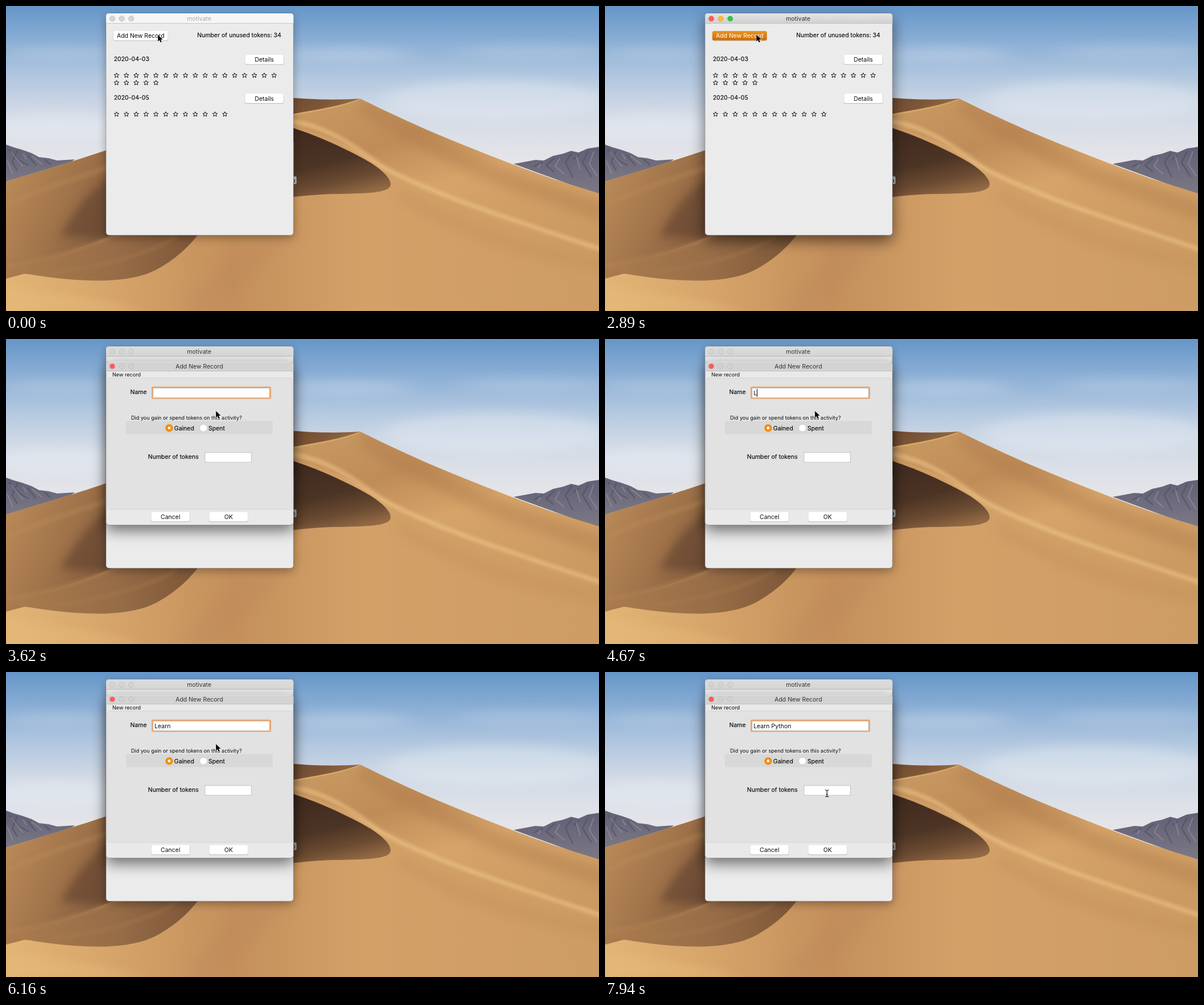
Write an HTML page that moves like this. It is 1043x537 px and loops after 8000 ms.

```html
<!DOCTYPE html>
<html lang="en">
<head>
<meta charset="utf-8">
<title>motivate</title>
<style>
  html, body { margin: 0; width: 100%; height: 100%; overflow: hidden; background: #cf9c60; }
  svg { display: block; width: 100vw; height: 100vh; }
  text { font: 10.5px Inter, "Open Sans", sans-serif; fill: #0b0b0b; white-space: pre; }
  .label { stroke: #0b0b0b; stroke-width: .15px; }
  .small { font-size: 9.1px; }
  .mid { text-anchor: middle; }
</style>
</head>
<body>
<svg id="stage" viewBox="0 0 1043 537" preserveAspectRatio="none">
  <defs>
    <linearGradient id="sky" x2="0" y2="1">
      <stop offset="0" stop-color="#6596c8"/><stop offset=".18" stop-color="#8aaed5"/>
      <stop offset=".36" stop-color="#b0c6df"/><stop offset=".55" stop-color="#d2dae6"/>
      <stop offset=".8" stop-color="#e5e5e9"/>
    </linearGradient>
    <linearGradient id="peak" x2=".75" y2="1">
      <stop offset="0" stop-color="#cb9c64"/><stop offset=".35" stop-color="#bf8c58"/>
      <stop offset=".6" stop-color="#d6a469"/><stop offset="1" stop-color="#cb9a62"/>
    </linearGradient>
    <linearGradient id="back" x2="1" y2=".3">
      <stop offset="0" stop-color="#6a482f"/><stop offset=".6" stop-color="#7d5637"/>
      <stop offset="1" stop-color="#9a6e44"/>
    </linearGradient>
    <linearGradient id="hollow" x1=".2" y1="0" x2=".55" y2="1">
      <stop offset="0" stop-color="#3c281e"/><stop offset=".55" stop-color="#4c3424"/>
      <stop offset=".8" stop-color="#6b4b32"/><stop offset="1" stop-color="#946a44"/>
    </linearGradient>
    <linearGradient id="left" gradientUnits="userSpaceOnUse" x1="0" y1="310" x2="200" y2="400">
      <stop offset="0" stop-color="#b98957"/><stop offset=".5" stop-color="#a0734a"/>
      <stop offset="1" stop-color="#7c573a"/>
    </linearGradient>
    <linearGradient id="basin" gradientUnits="userSpaceOnUse" x1="0" y1="460" x2="320" y2="430">
      <stop offset="0" stop-color="#ab7c4e"/><stop offset=".6" stop-color="#976d47"/>
      <stop offset="1" stop-color="#80593a"/>
    </linearGradient>
    <linearGradient id="front" gradientUnits="userSpaceOnUse" x1="0" y1="0" x2="1043" y2="0">
      <stop offset="0" stop-color="#e2b576"/><stop offset=".2" stop-color="#d4a268"/>
      <stop offset=".38" stop-color="#c48f5b"/><stop offset=".6" stop-color="#d3a168"/>
      <stop offset="1" stop-color="#cd9c64"/>
    </linearGradient>
    <linearGradient id="rock" x2="0" y2="1">
      <stop offset="0" stop-color="#606075"/><stop offset="1" stop-color="#7d7986"/>
    </linearGradient>
    <linearGradient id="bar" x2="0" y2="1">
      <stop offset="0" stop-color="#e4e4e4"/><stop offset="1" stop-color="#d0d0d0"/>
    </linearGradient>
    <linearGradient id="pressed" x2="0" y2="1">
      <stop offset="0" stop-color="#eb951d"/><stop offset="1" stop-color="#d06a02"/>
    </linearGradient>
    <filter id="soft3" x="-20%" y="-50%" width="140%" height="200%"><feGaussianBlur stdDeviation="3"/></filter>
    <filter id="soft8" x="-30%" y="-30%" width="160%" height="160%"><feGaussianBlur stdDeviation="8"/></filter>
    <filter id="soft13" x="-30%" y="-30%" width="160%" height="160%"><feGaussianBlur stdDeviation="13"/></filter>
    <filter id="soft22" x="-80%" y="-150%" width="260%" height="400%"><feGaussianBlur stdDeviation="22 9"/></filter>
    <clipPath id="dunes"><path id="ridge" d="M0 309C60 291 120 273 176 254L505 190C548 182 590 176 623 163C662 183 735 217 800 243C850 263 900 283 960 304L1043 330V537H0Z"/></clipPath>
  </defs>

  <rect width="1043" height="340" fill="url(#sky)"/>
  <g fill="#e5eaf2" filter="url(#soft22)">
    <ellipse cx="90" cy="215" rx="130" ry="24" opacity=".6"/>
    <ellipse cx="95" cy="82" rx="95" ry="10" opacity=".22"/>
    <ellipse cx="600" cy="85" rx="110" ry="14" opacity=".25"/>
    <ellipse cx="860" cy="165" rx="200" ry="36" opacity=".45"/>
    <ellipse cx="925" cy="80" rx="130" ry="12" opacity=".2"/>
  </g>
  <g fill="url(#rock)">
    <path d="M0 244L14 249L28 253L45 259L58 266L75 268L90 272L121 270L100 285L0 312Z"/>
    <path d="M893 278L915 274L931 271L946 272L962 264L980 260L994 255L1007 258L1023 251L1043 248V333Z"/>
  </g>
  <g fill="none" stroke="#484a60" stroke-width="2.5" opacity=".5">
    <path d="M5 252L25 273L40 281M38 262L53 281M68 270L79 280M20 254L11 275L20 290"/>
    <path d="M944 275L928 283M965 267L950 281L964 292M995 259L984 275L997 302M1024 256L1014 275L1030 301M1008 262L998 270"/>
  </g>
  <g fill="none" stroke="#a19ba1" stroke-width="2" opacity=".5">
    <path d="M9 256L30 283M2 272L12 296M45 264L64 279M30 260L36 270"/>
    <path d="M940 278L936 286M974 268L966 282L982 296M1003 264L1010 288M1034 256L1026 278L1040 300"/>
  </g>

  <path d="M480 160C520 163 565 167 623 163C597 178 553 188 480 194Z" fill="url(#back)"/>
  <use href="#ridge" fill="url(#front)"/>
  <g clip-path="url(#dunes)">
    <path d="M480 192C550 183 600 175 623 163L1043 330V432C890 390 735 324 660 279C610 248 560 223 480 205Z" fill="url(#peak)"/>
    <path d="M625 172C675 205 740 241 820 279S980 336 1050 364" fill="none" stroke="#ab784b" stroke-width="32" opacity=".35" filter="url(#soft8)"/>
    <path d="M500 203C560 210 612 246 658 280C740 328 860 366 1050 430" fill="none" stroke="#eec688" stroke-width="7" opacity=".7" filter="url(#soft3)"/>
    <path d="M623 163C592 177 545 185 490 194" fill="none" stroke="#dcae70" stroke-width="2.5" opacity=".7"/>
    <path d="M690 330C780 386 890 427 1050 455" fill="none" stroke="#b7844f" stroke-width="24" opacity=".2" filter="url(#soft8)"/>
    <path d="M470 205C530 219 589 247 631 270C662 287 680 306 676 317C671 329 635 330 586 331C550 331 526 334 470 340Z" fill="url(#hollow)"/>
    <path d="M0 309C60 291 120 273 176 254L300 240V400L0 480Z" fill="url(#left)"/>
    <path d="M0 350C65 320 126 302 190 281" fill="none" stroke="#bd8d5a" stroke-width="10" opacity=".35" filter="url(#soft3)"/>
    <path d="M95 405C120 365 140 325 205 285V410Z" fill="#55382a" opacity=".5" filter="url(#soft8)"/>
    <path d="M0 462C80 445 150 420 200 398H341C315 434 285 453 263 465C216 488 145 486 80 478C44 473 20 469 0 467Z" fill="url(#basin)"/>
    <path d="M0 459C80 443 140 424 205 400" fill="none" stroke="#bd8d5a" stroke-width="4" opacity=".5" filter="url(#soft3)"/>
    <path d="M80 470C160 460 250 438 300 406" fill="none" stroke="#ad7f50" stroke-width="5" opacity=".45" filter="url(#soft3)"/>
    <path d="M0 493C70 501 155 513 250 540H0Z" fill="#e9c17f" opacity=".35" filter="url(#soft8)"/>
    <path d="M320 537C390 485 455 423 505 370" fill="none" stroke="#b6815a" stroke-width="50" opacity=".22" filter="url(#soft13)"/>
  </g>

  <rect x="490" y="240" width="16.5" height="61" fill="#77736f"/>
  <rect x="490" y="300" width="21" height="13.5" rx="2" fill="#b5b4b1"/>
  <text x="502.5" y="310.5">o</text>

  <g id="quietShade"><rect x="176" y="18" width="329.5" height="390" rx="5" opacity=".33" filter="url(#soft8)"/></g>
  <g id="busyShade"><rect x="176" y="23" width="329.5" height="390" rx="5" opacity=".55" filter="url(#soft13)"/></g>
  <g id="main"></g>
  <g id="dialog"></g>
  <g id="arrow"><path d="M0 0V11.6L2.7 9.1L4.5 13.3L6.6 12.4L4.8 8.3H8.5Z" stroke="#fff" stroke-width="1.1" paint-order="stroke" stroke-linejoin="round"/></g>
  <g id="beam" fill="none" stroke-linecap="round">
    <path id="beamLine" d="M-3 -6Q0 -6 0 -4Q0 -6 3 -6M0 -4V4M-3 6Q0 6 0 4Q0 6 3 6M-1.5 2H1.5" stroke="#fff" stroke-width="2.6"/>
    <path d="M-3 -6Q0 -6 0 -4Q0 -6 3 -6M0 -4V4M-3 6Q0 6 0 4Q0 6 3 6M-1.5 2H1.5" stroke="#111" stroke-width="1.1"/>
  </g>
</svg>
<script>
const $ = id => document.getElementById(id);
const LOOP = 8000;

const label = (x, y, s, cls = 'label', extra = '') =>
  `<text x="${x}" y="${y}" class="${cls}" ${extra}>${s}</text>`;

const button = (x, y, w, s, id = '') =>
  `<rect x="${x}" y="${y + .5}" width="${w}" height="17" rx="3.2" fill="#b9b9b9"/>
   <rect ${id && `id="${id}"`} x="${x + .4}" y="${y}" width="${w - .8}" height="16.6" rx="3" fill="#fff"/>
   ${label(x + w / 2, y + 12.2, s, 'mid', id && `id="${id}Text"`)}`;

const lights = (y, colours, rim) => colours.map((c, i) =>
  `<circle cx="${187 + i * 16.6}" cy="${y}" r="4.8" fill="${c}" stroke="${rim}" stroke-width=".7"/>`).join('');

function stars(n, y) {
  let d = '';
  for (let i = 0; i < n; i++) {
    for (let k = 0; k < 10; k++) {
      const r = k % 2 ? 2 : 4.5, a = Math.PI * (k / 5 - .5);
      d += (k ? 'L' : 'M') + (194.4 + i * 17.32 + r * Math.cos(a)).toFixed(2) + ' ' + (y + r * Math.sin(a)).toFixed(2);
    }
    d += 'Z';
  }
  return `<path d="${d}" fill="none" stroke="#111" stroke-width="1"/>`;
}

const titleBar = (y, h, fill, id) =>
  `<path ${id && `id="${id}"`} d="M176 ${y + h}V${y + 5}q0 -5 5 -5H500.5q5 0 5 5V${y + h}Z" fill="${fill}"/>
   <path d="M176 ${y + h - .5}H505.5" stroke="#bcbcbc" stroke-width=".8"/>`;

$('main').innerHTML = `
  <rect x="176" y="13" width="329.5" height="390.5" rx="5" fill="#ebebeb" stroke="#77777a" stroke-opacity=".5" stroke-width=".8"/>
  ${titleBar(13, 18, '#f6f6f6', 'mainBar')}
  <g id="lightsOff">${lights(22.3, Array(3).fill('#d5d5d5'), '#bdbdbd')}</g>
  <g id="lightsOn">${lights(22.3, ['#fc5b57', '#fdbc2e', '#29c940'], '#8885')}</g>
  ${label(339.7, 26.2, 'motivate', 'mid', 'id="mainTitle"')}
  <g id="list">
    ${button(188.5, 44, 96.5, 'Add New Record', 'add')}
    ${label(336.3, 54.5, 'Number of unused tokens: 34')}
    ${label(189.7, 96.8, '2020-04-03')}${button(420, 86, 68.5, 'Details')}
    ${stars(17, 122.3)}${stars(5, 135.3)}
    ${label(189.7, 165.2, '2020-04-05')}${button(420, 154.5, 68.5, 'Details')}
    ${stars(12, 190.6)}
  </g>`;

const field = (x, y, w, h) =>
  `<rect x="${x}" y="${y}" width="${w}" height="${h}" fill="#fff" stroke="#b8b8b8" stroke-width=".8"/>`;

$('dialog').innerHTML = `
  <rect x="176" y="49" width="329.5" height="288" rx="5" opacity=".55" filter="url(#soft13)"/>
  <rect x="176" y="39.5" width="329.5" height="288" rx="5" fill="#e9e9e9" stroke="#8b8b8b" stroke-width=".7"/>
  ${titleBar(39.5, 17.5, '#d3d3d3', '')}
  <path d="M180 40H501" stroke="#ededed"/>
  ${lights(48, ['#fc5b57', '#d0d0d0', '#d0d0d0'], '#bebebe')}
  ${label(340, 52, 'Add New Record', 'mid', 'style="fill:#333"')}
  ${label(187, 66.3, 'New record', 'small')}
  <rect x="178.5" y="68.5" width="324.5" height="231.5" rx="3" fill="#e2e2e2" stroke="#d5d5d5"/>
  ${label(218.5, 96.8, 'Name')}
  <rect x="256" y="83.8" width="210.3" height="21.6" rx="2.5" fill="#e8a66f"/>
  ${field(258.8, 86.5, 204.7, 16.8)}
  ${label(261.2, 98.8, '', '', 'id="typed"')}
  <rect id="caret" y="88" width="1" height="14"/>
  ${label(220, 142.2, 'Did you gain or spend tokens on this activity?', 'small')}
  <rect x="211" y="144.5" width="258" height="23" fill="#d8d8d8"/>
  <circle cx="287" cy="156.7" r="6.8" fill="#ef9013"/><circle cx="287" cy="156.7" r="2.4" fill="#fff"/>
  ${label(295.8, 160.7, 'Gained')}
  <circle cx="347.2" cy="156.7" r="6.5" fill="#fff" stroke="#bfbfbf" stroke-width=".7"/>
  ${label(356, 160.7, 'Spent')}
  ${label(249.8, 210.5, 'Number of tokens')}
  ${field(350, 200, 81.7, 17)}
  ${button(255, 304.7, 68.5, 'Cancel')}${button(357, 304.7, 69, 'OK')}`;

// [start, text, caret x or 0 when blinked off]
const typing = [
  [0, '', 261], [3620, '', 0], [4070, '', 261], [4670, 'L', 267], [5110, 'L', 0],
  [5260, 'Lea', 279], [5410, 'Lear', 283], [5560, 'Learn ', 292], [6160, 'Learn ', 0],
  [6460, 'Learn P', 298], [6760, 'Learn Py', 304], [6900, 'Learn Pyt', 308],
  [7050, 'Learn Pytho', 321], [7200, 'Learn Python', 327], [7790, 'Learn Python', 0]
];

// [start, x, y, text cursor?]
const pointer = [
  [0, 267.3, 50.8], [150, 266.3, 50.8], [3320, 367, 125.8], [3470, 369.3, 126.8],
  [7490, 424, 143.3], [7640, 444, 162.3], [7790, 411, 212.3, true], [7940, 390.5, 213.8, true]
];

const at = (steps, t) => steps.findLast(s => s[0] <= t);
const show = (id, on) => $(id).setAttribute('display', on ? 'inline' : 'none');

function render(t) {
  const pressed = t >= 2890 && t < 3020, open = t >= 3020;
  show('quietShade', !pressed);
  show('busyShade', pressed);
  show('lightsOn', pressed);
  show('lightsOff', !pressed);
  show('list', !open);
  show('dialog', open);
  $('mainBar').setAttribute('fill', pressed ? 'url(#bar)' : open ? '#dadada' : '#f6f6f6');
  $('mainTitle').style.fill = pressed || open ? '#333' : '#a9a9a9';
  $('add').setAttribute('fill', pressed ? 'url(#pressed)' : '#fff');
  $('addText').style.fill = pressed ? '#fff' : '#0b0b0b';

  const [, text, caretX] = at(typing, t);
  $('typed').textContent = text;
  $('caret').setAttribute('x', caretX);
  show('caret', caretX > 0);

  const [, x, y, isBeam] = at(pointer, t);
  const shape = isBeam ? 'beam' : 'arrow';
  show('beam', isBeam);
  show('arrow', !isBeam);
  $(shape).setAttribute('transform', `translate(${x} ${y})`);
}

const start = performance.now();
function tick() {
  render((performance.now() - start) % LOOP);
  requestAnimationFrame(tick);
}
tick();
</script>
</body>
</html>
```
